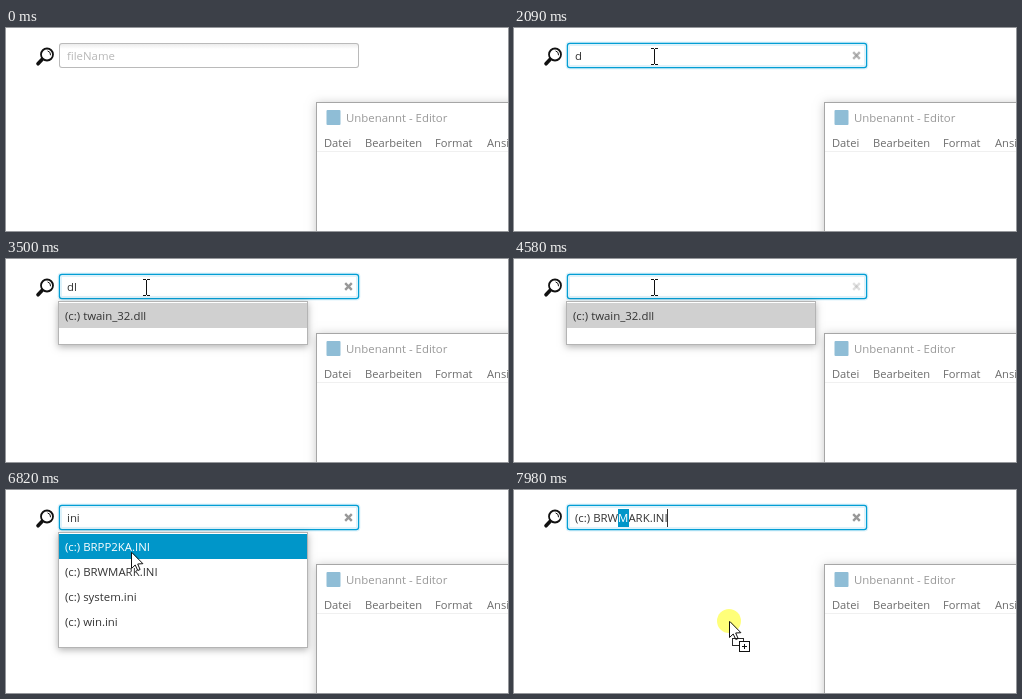
Write an HTML page with a canvas that moves like this. It is 502 px wide and 203 px high and loops after 8 s.

```html
<!DOCTYPE html>
<html lang="de">
<head>
<meta charset="utf-8">
<title>Dateisuche</title>
<style>
html, body { margin: 0; width: 100%; height: 100%; overflow: hidden; background: #fff; }
canvas { display: block; width: 502px; height: 203px; }
</style>
</head>
<body>
<canvas id="stage" width="502" height="203"></canvas>
<script>
const ctx = document.getElementById('stage').getContext('2d');
const LOOP = 8000, STEP = 77;
const FIELD = { x: 53, y: 15, w: 300, h: 25 };
const BLUE = '#0096c9', INK = '#333';
const FOCUS = 530, PICK = 7290, DRAG = 7600, SELECT = 7675;

// [time, value]: each value holds until the next one
const TYPED = [[0, ''], [1860, 'd'], [2490, 'dl'], [4200, 'd'], [4430, ''],
  [5360, 'i'], [5440, 'in'], [5590, 'ini'], [PICK, '(c:) BRWMARK.INI']];
const LISTS = [
  [0, null],
  [2180, ['bootstat.dat', 'DtcInstall.log', 'notepad.exe', 'regedit.exe', 'twain_32.dll',
    'WindowsShell.Manifest', 'WindowsUpdate.log']],
  [2820, ['twain_32.dll']],
  [4650, ['bfsvc.exe', 'bootstat.dat', 'BRPP2KA.INI', 'BRWMARK.INI', 'DtcInstall.log',
    'explorer.exe', 'HelpPane.exe', 'hh.exe']],
  [5820, ['BRPP2KA.INI', 'BRWMARK.INI', 'system.ini', 'win.ini']],
  [PICK, null]
];
const CARET_FLIPS = [FOCUS, 1020, 1470, 1860, 2330, 2490, 3030, 3500, 4040, 4200, 4890, 5360, 6050, 6510, 7050];
const MOUSE = [[220, 372, 184], [530, 160, 34], [840, 148, 36], [943, 148, 36], [1020, 144, 32],
  [1080, 140, 28], [6433, 140, 28], [7050, 118, 78], [PICK, 118, 78], [7520, 107, 30],
  [DRAG, 107, 29], [7980, 215, 131]];

const clamp = v => Math.max(0, Math.min(1, v));
const within = (t, a, b) => t >= a && t < b;
const held = (list, t) => list.filter(k => k[0] <= t).pop()[1];

function box(x, y, w, h, color) {
  ctx.fillStyle = color;
  ctx.fillRect(x, y, w, h);
}

function round(x, y, w, h, r, color) {
  ctx.fillStyle = color;
  ctx.beginPath();
  ctx.roundRect(x, y, w, h, r);
  ctx.fill();
}

function inset(d, r, color) {
  round(FIELD.x + d, FIELD.y + d, FIELD.w - 2 * d, FIELD.h - 2 * d, r, color);
}

function disc(x, y, r, color) {
  ctx.fillStyle = color;
  ctx.beginPath();
  ctx.arc(x, y, r, 0, Math.PI * 2);
  ctx.fill();
}

function line(points, width, color, cap = 'butt') {
  ctx.strokeStyle = color;
  ctx.lineWidth = width;
  ctx.lineCap = cap;
  ctx.beginPath();
  points.forEach(([x, y]) => ctx.lineTo(x, y));
  ctx.stroke();
}

function setFont(size) {
  ctx.font = size + 'px "Open Sans", "Noto Sans", sans-serif';
}

function label(text, x, y, color, size = 11.4) {
  setFont(size);
  ctx.fillStyle = color;
  ctx.fillText(text, x, y);
}

function shadow(blur, color, dy = 0) {
  ctx.shadowBlur = blur;
  ctx.shadowColor = color;
  ctx.shadowOffsetY = dy;
}

function mouseAt(t) {
  if (t < MOUSE[0][0]) return null;
  const i = MOUSE.findIndex(k => k[0] > t);
  if (i < 0) {
    const [, x, y] = MOUSE[MOUSE.length - 1];
    return { x, y };
  }
  const [t0, x0, y0] = MOUSE[i - 1], [t1, x1, y1] = MOUSE[i];
  const p = Math.floor((t - t0) / STEP) * STEP / (t1 - t0);
  const e = p * p * (3 - 2 * p);
  return { x: Math.round(x0 + (x1 - x0) * e), y: Math.round(y0 + (y1 - y0) * e) };
}

function drawMagnifier() {
  line([[36, 31.5], [32, 35.8]], 3.6, '#111', 'round');
  ctx.strokeStyle = '#111';
  ctx.lineWidth = 1.8;
  ctx.beginPath();
  ctx.arc(41, 26.5, 6, 0, Math.PI * 2);
  ctx.stroke();
  ctx.lineWidth = 1;
  ctx.beginPath();
  ctx.arc(41, 26.5, 3.6, -1.3, 0.1);
  ctx.stroke();
}

function drawEditor() {
  ctx.save();
  shadow(9, 'rgba(0,0,0,.22)', 1);
  box(310, 74, 220, 160, '#a6a6a6');
  ctx.restore();
  box(311, 75, 191, 128, '#fff');
  box(311, 123, 191, 1, '#f0f0f0');
  round(320.5, 82, 14, 15, 1, '#8fbdd6');
  label('Unbenannt - Editor', 340, 94, '#999');
  [['Datei', 318], ['Bearbeiten', 359], ['Format', 429], ['Ansicht', 481]]
    .forEach(([text, x]) => label(text, x, 119, '#6d6d6d', 11.15));
}

function clearAlpha(t) {
  if (t < 4430) return clamp((t - 1860) / 320);
  if (t < 5360) return clamp(1 - (t - 4430) / 220);
  return clamp((t - 5360) / 310);
}

function drawField(t) {
  const focused = t >= FOCUS, text = held(TYPED, t);
  if (focused) {
    inset(-0.2, 3, '#039ed3');
    inset(1, 2, '#fff');
    inset(-1.4, 4, 'rgba(3,158,211,.13)');
    inset(3, 0, '#fff');
  } else {
    const shade = ctx.createLinearGradient(0, FIELD.y + 1, 0, FIELD.y + 6);
    shade.addColorStop(0, '#ececec');
    shade.addColorStop(1, '#fff');
    inset(0, 3, '#bababa');
    inset(1, 2, shade);
    label('fileName', 61, 32, '#b8b8b8');
  }
  label(text, 61, 32, INK);
  if (t >= SELECT) {
    const x = Math.round(61 + ctx.measureText('(c:) BRW').width);
    box(x, 19, 11, 18, BLUE);
    label('M', x, 32, '#fff');
  }
  if (CARET_FLIPS.filter(f => f <= t).length % 2) {
    setFont(11.4);
    box(Math.round(60.5 + ctx.measureText(text).width), 19, 1, 18, '#333');
  }
  ctx.save();
  ctx.globalAlpha = clearAlpha(t);
  line([[339.2, 24.2], [345.8, 30.8]], 2.4, '#989898');
  line([[345.8, 24.2], [339.2, 30.8]], 2.4, '#989898');
  ctx.restore();
}

function drawPopup(t, mouse) {
  const items = held(LISTS, t);
  if (!items) return;
  const h = 19 + 24 * items.length;
  ctx.save();
  shadow(7, 'rgba(0,0,0,.3)', 2);
  box(52, 42, 250, h + 1, '#b4b4b4');
  ctx.restore();
  box(53, 43, 248, h - 1, '#fff');
  const hover = mouse.y >= 44 ? Math.floor((mouse.y - 44) / 25) : -1;
  const idle = within(t, 4650, 5820) ? -1 : 0;
  const lit = hover >= 0 ? hover : idle;
  items.forEach((name, i) => {
    const y = 44 + 25 * i;
    if (i === lit) box(53, y, 248, 25, hover >= 0 ? BLUE : '#d0d0d0');
    label('(c:) ' + name, 59, y + 17, i === hover ? '#fff' : INK);
  });
}

function drawBeam(x, y) {
  box(x, y - 7, 1, 15, '#111');
  for (const edge of [y - 8, y + 8]) {
    box(x - 3, edge, 3, 1, '#111');
    box(x + 1, edge, 3, 1, '#111');
  }
}

function drawArrow(x, y) {
  ctx.save();
  ctx.translate(x + 0.5, y + 0.5);
  ctx.beginPath();
  [[0, 0], [0, 16], [3.7, 12.5], [6.3, 18], [8.6, 17], [6.2, 11.5], [11, 11.2]]
    .forEach(([px, py]) => ctx.lineTo(px, py));
  ctx.closePath();
  ctx.fillStyle = '#fff';
  ctx.fill();
  ctx.strokeStyle = '#111';
  ctx.lineWidth = 1;
  ctx.stroke();
  ctx.restore();
}

function drawDragBadge(x, y) {
  ctx.save();
  ctx.strokeStyle = '#111';
  ctx.lineWidth = 1;
  ctx.setLineDash([1, 1]);
  ctx.strokeRect(x + 3.5, y + 17.5, 11, 7);
  ctx.restore();
  box(x + 10, y + 20, 11, 11, '#111');
  box(x + 11, y + 21, 9, 9, '#fff');
  box(x + 13, y + 25, 5, 1, '#111');
  box(x + 15, y + 23, 1, 5, '#111');
}

function drawMouse(t, { x, y }) {
  const pressed = within(t, FOCUS, 690) || within(t, 7210, PICK) || t >= DRAG;
  if (pressed) disc(x, y, 12, 'rgba(255,255,0,.52)');
  const overField = within(x, 53, 353) && within(y, 15, 41);
  if (overField && t < SELECT) drawBeam(x, y);
  else drawArrow(x, y);
  if (t >= SELECT) drawDragBadge(x, y);
}

function draw(now) {
  const t = now % LOOP, mouse = mouseAt(t);
  box(0, 0, 502, 203, '#fff');
  drawMagnifier();
  drawEditor();
  drawField(t);
  if (mouse) {
    drawPopup(t, mouse);
    drawMouse(t, mouse);
  }
}

const start = performance.now();
function tick() {
  draw(performance.now() - start);
  requestAnimationFrame(tick);
}
tick();
</script>
</body>
</html>
```
